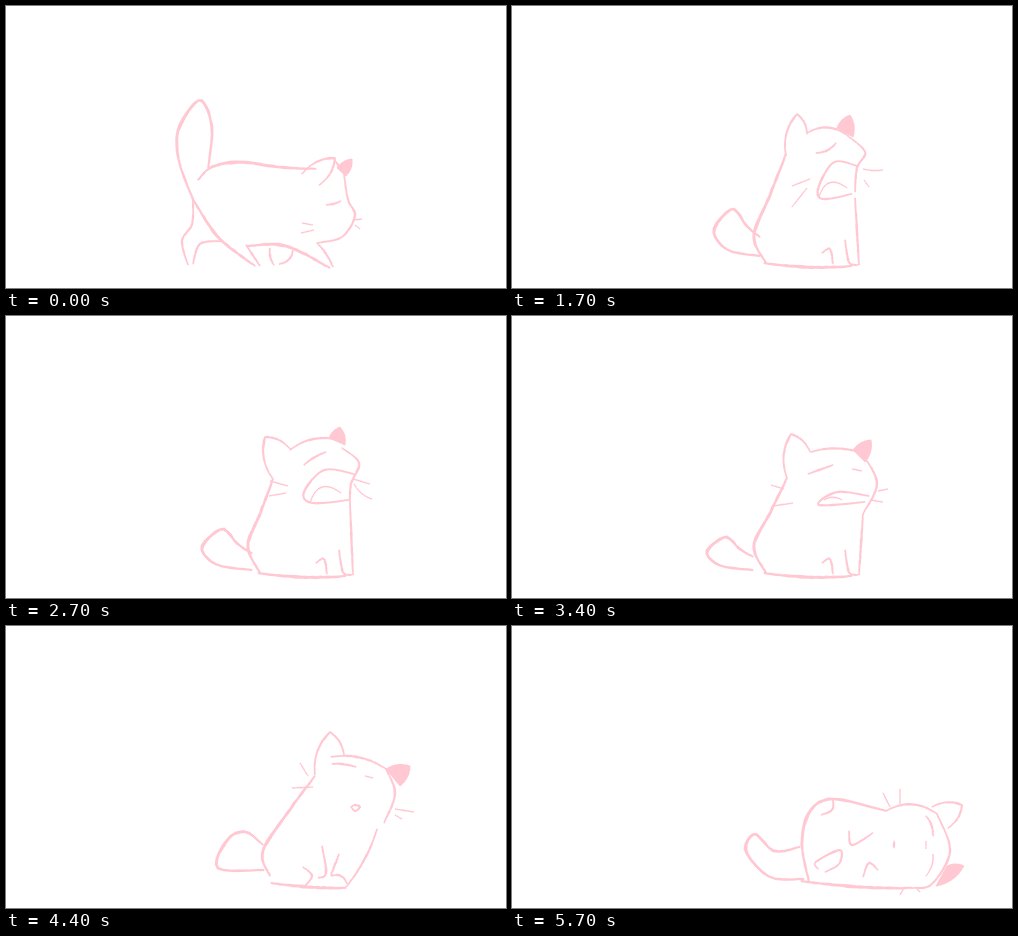
Animation, 500 px wide and 282 px high, one loop 5.8 s. Source, as an HTML page:

```html
<!DOCTYPE html>
<html lang="en">
<head>
<meta charset="utf-8">
<title>Pink cat</title>
<style>
html, body { margin: 0; width: 100%; height: 100%; overflow: hidden; background: #fff; }
svg { display: block; width: 100vw; height: 100vh; }
path { fill: #ffc8d2; stroke: #ffc8d2; stroke-width: 0.9; stroke-linejoin: round; shape-rendering: crispEdges; }
</style>
</head>
<body>
<svg id="stage" viewBox="0 0 500 282"></svg>
<script>
const LOOP = 5800, STEP = 100, SAMPLES = 24;

const lerp = (a, b, k) => a + (b - a) * k;
const ease = k => k * k * (3 - 2 * k);
const noise = n => Math.abs(Math.sin(n * 127.1 + 3.7) * 43758.5) % 1;

// Every shape is a function from 0..1 to a point.

// A bow between two points; bend is its height relative to its length.
const line = (x1, y1, x2, y2, bend = 0) => u => {
  const lift = bend * 4 * u * (1 - u);
  return [lerp(x1, x2, u) - (y2 - y1) * lift, lerp(y1, y2, u) + (x2 - x1) * lift];
};

// A smooth curve through a few points.
const curve = (...xy) => u => {
  const last = xy.length / 2 - 1;
  const pos = u * last, i = Math.min(last - 1, Math.floor(pos)), f = pos - i;
  return [0, 1].map(axis => {
    const [a, b, c, d] = [-1, 0, 1, 2].map(n => xy[2 * Math.max(0, Math.min(last, i + n)) + axis]);
    return b + f / 2 * (c - a + f * (2 * a - 5 * b + 4 * c - d + f * (3 * (b - c) + d - a)));
  });
};

const ear = (x1, y1, tipX, tipY, x2, y2) => {
  const rise = line(x1, y1, tipX, tipY, -0.12), fall = line(tipX, tipY, x2, y2, -0.12);
  return u => u < 0.5 ? rise(2 * u) : fall(2 * u - 1);
};

// A tail curled around the given box, open to the right.
const curledTail = (x, y, w, h) => curve(
  x + w, y + h, x + 0.3 * w, y + 0.87 * h, x, y + 0.45 * h,
  x + 0.4 * w, y, x + 0.7 * w, y + 0.35 * h, x + w, y + 0.6 * h);

// The lower body stays put while the neck moves.
const seated = (neckX, neckY, chinX, chinY) => ({
  back: curve(254, 257, 242, 230, lerp(242, neckX, 0.5), lerp(230, neckY, 0.5), neckX, neckY),
  belly: line(252, 257, 340, 260, 0.03),
  legA: line(chinX, chinY, 347, 259),
  legB: curve(333, 234, 337, 256, 346, 259),
  paw: curve(310, 247, 318, 243, 321, 258)
});

const walk = {
  tail: curve(188, 196, 173, 155, 173, 122, 194, 94, 206, 122, 202, 162),
  back: curve(192, 174, 206, 161, 235, 156, 272, 161, 310, 163),
  ear: ear(296, 168, 329, 152, 313, 179),
  farEar: ear(331, 162, 346, 153, 340, 170),
  brow: line(328, 153, 338, 168),
  face: curve(338, 168, 342, 194, 349, 210, 336, 231, 311, 237),
  eye: line(320, 199, 335, 195, 0.05),
  w1: line(296, 217, 307, 219), w2: line(295, 227, 308, 224),
  w3: line(348, 214, 356, 213), w4: line(349, 219, 354, 223),
  hind: curve(187, 192, 186, 218, 176, 235, 182, 259),
  thigh: curve(188, 195, 212, 231, 249, 260),
  shin: curve(215, 235, 194, 238, 187, 258),
  belly: curve(241, 240, 280, 240, 324, 262),
  legA: line(311, 237, 327, 261, -0.05),
  legB: line(240, 239, 254, 260),
  paw: line(264, 242, 268, 259, 0.1),
  pawB: line(287, 243, 273, 258, -0.2)
};

const sit = {
  tail: curledTail(201, 177, 48, 71),
  back: curve(258, 260, 246, 230, 263, 189, 300, 154),
  ear: ear(300, 154, 332, 133, 325, 159),
  farEar: ear(338, 151, 359, 139, 354, 157),
  brow: line(331, 149, 356, 173, -0.15),
  face: curve(356, 173, 365, 192, 352, 208, 349, 222),
  eye: line(331, 183, 350, 178, 0.1),
  w1: line(321, 202, 337, 199), w2: line(327, 217, 341, 206),
  w3: line(367, 191, 378, 190), w4: line(365, 199, 371, 204),
  belly: curve(250, 254, 285, 263, 313, 260, 313, 250),
  legA: curve(346, 226, 346, 257, 354, 260),
  legB: line(336, 228, 343, 259),
  paw: curve(308, 249, 315, 249, 317, 260),
  pawB: line(318, 252, 332, 261, 0.15)
};

const yawn = {
  ...seated(274, 148, 343, 192),
  tail: curledTail(202, 203, 46, 47),
  ear: ear(274, 150, 285, 108, 295, 128),
  farEar: ear(325, 122, 338, 109, 341, 131),
  brow: line(295, 127, 336, 130, -0.17),
  face: curve(336, 130, 353, 146, 345, 162, 343, 186),
  eye: line(304, 147, 324, 137, 0.12),
  mouth: curve(345, 160, 322, 156, 307, 180, 310, 193, 340, 188),
  tongue: line(307, 191, 335, 182, -0.35),
  w1: line(280, 180, 298, 173), w2: line(280, 201, 295, 182),
  w3: line(351, 163, 371, 164, 0.05), w4: line(352, 174, 357, 181)
};

const howl = {
  ...seated(267, 163, 344, 188),
  tail: curledTail(196, 213, 50, 41),
  ear: ear(267, 163, 259, 121, 284, 133),
  farEar: ear(323, 122, 334, 111, 339, 129),
  brow: line(284, 134, 336, 125, -0.13),
  face: curve(336, 132, 353, 147, 345, 168, 344, 188),
  eye: line(298, 149, 320, 136, -0.05),
  mouth: curve(348, 158, 318, 154, 298, 176, 306, 187, 343, 184),
  tongue: line(304, 187, 335, 177, -0.35),
  w1: line(264, 165, 282, 170), w2: line(263, 180, 280, 177),
  w3: line(347, 163, 364, 168), w4: line(348, 168, 366, 183, 0.1)
};

const grump = {
  ...seated(275, 162, 351, 198),
  tail: curledTail(195, 221, 46, 33),
  ear: ear(275, 162, 279, 118, 298, 136),
  farEar: ear(341, 134, 359, 124, 353, 146),
  brow: line(299, 136, 350, 137, -0.08),
  face: curve(352, 140, 365, 168, 351, 198),
  eye: line(296, 158, 321, 149),
  eye2: line(340, 153, 350, 155),
  mouth: curve(357, 180, 325, 176, 307, 189, 353, 186),
  tongue: line(312, 184, 330, 184, -0.15),
  w1: line(259, 169, 272, 173), w2: line(261, 190, 281, 187),
  w3: line(366, 175, 376, 173), w4: line(358, 184, 371, 186)
};

const lean = {
  tail: curve(258, 244, 212, 242, 222, 213, 240, 206, 257, 219),
  back: curve(264, 250, 257, 225, 285, 182, 309, 150),
  ear: ear(309, 149, 324, 106, 338, 130),
  farEar: ear(380, 143, 404, 140, 394, 160),
  brow: line(325, 131, 380, 143, -0.1),
  face: curve(380, 143, 389, 168, 378, 197),
  eye: line(326, 138, 350, 141, -0.05),
  eye2: line(359, 150, 367, 152),
  mouth: curve(345, 181, 349, 179, 354, 181, 349, 185, 345, 181),
  w1: line(294, 137, 302, 150), w2: line(286, 162, 307, 161),
  w3: line(389, 183, 408, 186), w4: line(389, 189, 396, 193),
  belly: line(265, 257, 340, 262, 0.02),
  legA: line(371, 203, 340, 261, -0.05),
  legB: line(333, 228, 325, 249),
  paw: curve(297, 241, 306, 250, 298, 261),
  pawB: curve(316, 220, 320, 247, 312, 252),
  pawC: line(325, 250, 341, 258, -0.25)
};

const lie = {
  tail: curve(292, 253, 258, 251, 234, 225, 243, 208, 262, 225, 288, 221),
  back: curve(297, 256, 290, 218, 298, 185, 322, 173, 374, 185),
  ear: ear(420, 181, 450, 179, 436, 202),
  farEar: ear(435, 240, 452, 240, 424, 260),
  brow: line(374, 185, 425, 188, -0.16),
  face: curve(425, 188, 438, 225, 420, 258, 400, 262),
  eye: line(414, 190, 421, 210, -0.1),
  eye2: line(414, 215, 414, 223),
  mouth: line(382, 215, 382, 222),
  tongue: line(421, 228, 414, 250, -0.1),
  w1: line(371, 167, 378, 181), w2: line(388, 163, 388, 178),
  w3: line(392, 262, 388, 269), w4: line(404, 262, 408, 266),
  belly: line(289, 255, 400, 262, 0.02),
  legB: curve(321, 173, 320, 184, 309, 189),
  paw: curve(306, 243, 304, 236, 328, 224, 327, 238, 313, 246),
  pawB: curve(351, 251, 357, 237, 366, 244),
  pawC: curve(337, 205, 340, 219, 361, 207)
};

// time, pose, horizontal and vertical shift
const keys = [
  [0, walk], [600, sit, 7, -4], [900, sit], [1200, sit], [1600, yawn], [2300, yawn],
  [2700, howl], [2900, howl], [3400, grump], [3700, grump], [4400, lean], [5100, lie], [LOOP, lie]
];

const heavy = ["tail", "back", "belly", "thigh"];
const fine = ["eye2", "tongue", "w1", "w2", "w3", "w4"];
const weight = part => heavy.includes(part) ? 2.3 : fine.includes(part) ? 0.7 : 1.5;

const stage = document.getElementById("stage");
const paths = {};
for (const part of new Set(keys.flatMap(key => Object.keys(key[1]))))
  paths[part] = stage.appendChild(document.createElementNS("http://www.w3.org/2000/svg", "path"));

const outline = points => "M" + points.map(p => p.map(v => v.toFixed(1)).join()).join("L") + "Z";

// A pencil stroke: thick in the middle, thin at the ends, a little uneven.
function pencil(points, width) {
  const side = sign => points.map(([x, y], i) => {
    const [ax, ay] = points[Math.max(0, i - 1)], [bx, by] = points[Math.min(SAMPLES, i + 1)];
    const length = Math.hypot(bx - ax, by - ay) || 1;
    const taper = 0.5 + 0.5 * Math.sin(Math.PI * i / SAMPLES);
    const half = sign * width / 2 * taper * (0.7 + 0.6 * noise(i + sign * 0.3));
    return [x - (by - ay) / length * half, y + (bx - ax) / length * half];
  });
  return outline([...side(1), ...side(-1).reverse()]);
}

function draw(time) {
  const next = keys.findIndex(key => key[0] > time);
  const [t0, from, x0 = 0, y0 = 0] = keys[next - 1], [t1, to, x1 = 0, y1 = 0] = keys[next];
  const k = ease((time - t0) / (t1 - t0));
  const near = k < 0.5 ? from : to;
  for (const part in paths) {
    if (!near[part]) {
      paths[part].setAttribute("d", "");
      continue;
    }
    const a = from[part] || near[part], b = to[part] || near[part];
    const points = Array.from({ length: SAMPLES + 1 }, (_, i) => {
      const u = i / SAMPLES, p = a(u), q = b(u);
      return [lerp(p[0] + x0, q[0] + x1, k), lerp(p[1] + y0, q[1] + y1, k)];
    });
    paths[part].setAttribute("d", part === "farEar" ? outline(points) : pencil(points, weight(part)));
  }
}

function tick(now) {
  draw(Math.floor(now % LOOP / STEP) * STEP);
  requestAnimationFrame(tick);
}
draw(0);
requestAnimationFrame(tick);
</script>
</body>
</html>
```
